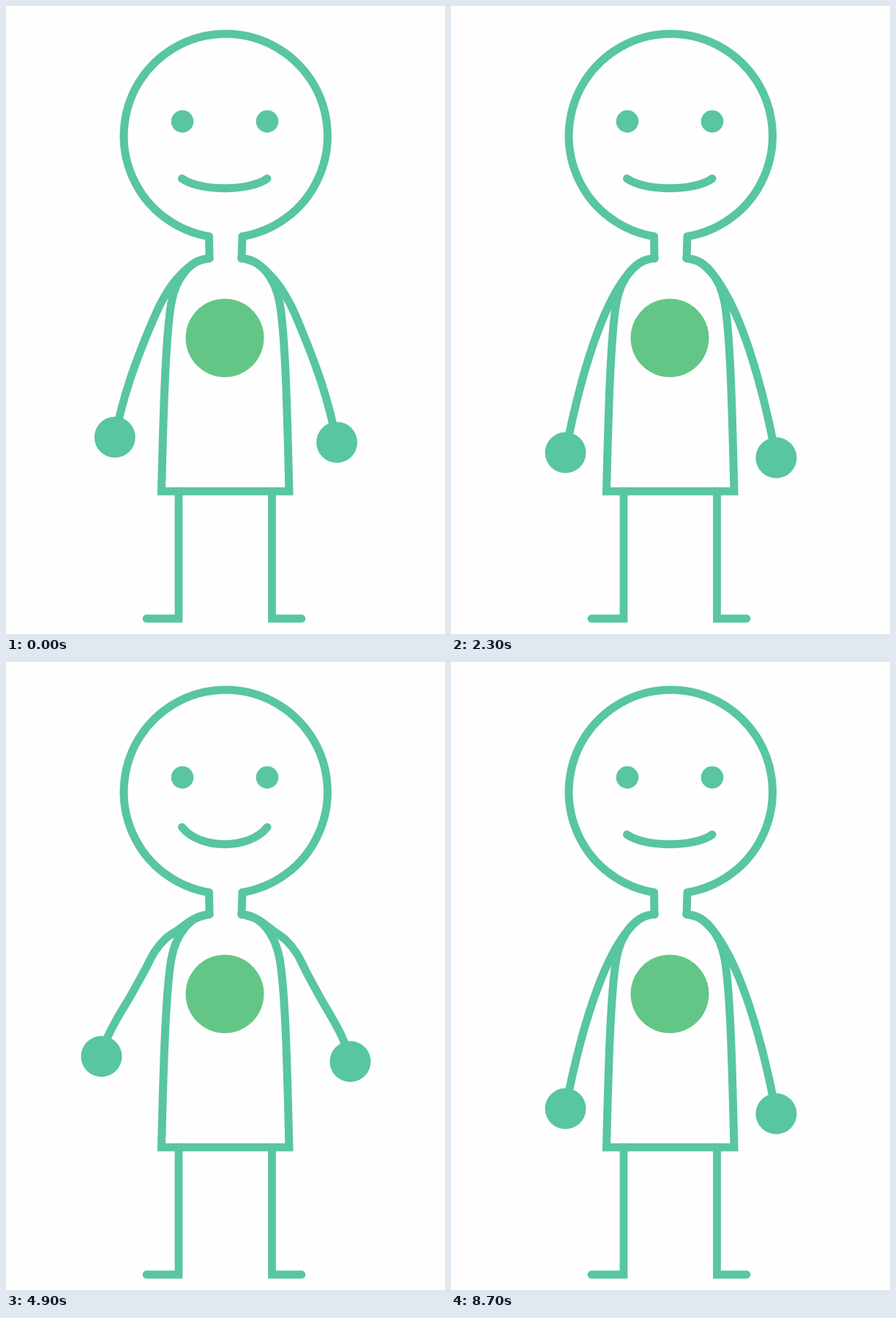
Write an HTML page with a canvas that moves like this. It is 600 px wide and 857 px high and loops after 9 s.

```html
<!DOCTYPE html>
<html lang="en">
<head>
<meta charset="utf-8">
<title>Flexing figure</title>
<style>
  html, body { margin: 0; width: 100%; height: 100%; overflow: hidden; background: #fefeff; }
  canvas { display: block; width: 600px; height: 857px; }
</style>
</head>
<body>
<canvas id="stage" width="600" height="857"></canvas>
<script>
const ctx = document.getElementById('stage').getContext('2d');
const GREEN = '#58c69e', BADGE = '#63c686', PAPER = '#fefeff';
const CYCLE = 3000, STEP = 100, HAND = 28, JOINTS = 10;

const clamp = x => Math.max(0, Math.min(1, x));
const smooth = x => clamp(x) ** 2 * (3 - 2 * clamp(x));
const mix = (a, b, k) => a + (b - a) * k;

// Left arm, from neck over shoulder, biceps and elbow to the hand
const hanging = Array.from({ length: JOINTS }, (_, i) => {
  const k = i / (JOINTS - 1), m = 1 - k;
  const bezier = (a, b, c, d) => a * m ** 3 + 3 * b * m * m * k + 3 * c * m * k * k + d * k ** 3;
  return [bezier(278, 228, 183, 156.5), bezier(344, 345, 470, 609.5)];
});
const half = [[278,344],[240,358],[202,378],[182,362],[166,351],[150,361],[112,386],[78,378],[57,348],[50,318]];
const raised = [[278,344],[240,358],[198,374],[175,345],[155,329],[137,340],[108,360],[58,342],[34,293],[40,245]];
const flexed = [[278,344],[240,358],[200,372],[176,340],[156,320],[138,329],[104,351],[56,335],[38,298],[60,241]];
const poses = [hanging, half, raised, flexed];

// Progress through the poses: a quick lift, a short hold and an almost even drop
function lift(t) {
  const up = smooth(((t + 290) / 970) ** 2);
  const down = clamp((2000 - t) / 1082) ** 1.08;
  return 3.2 * Math.min(up, down);
}

const smile = t => Math.min(smooth(t / 517), smooth((2250 - t) / 833));

function leftArm(u) {
  const n = Math.min(2, Math.floor(u)), k = u - n;
  // The forearm swings outwards on its way past the elbow
  const swing = n === 1 ? 14 * Math.sin(Math.PI * k) : 0;
  return poses[n].map(([x, y], i) => {
    const [x1, y1] = poses[n + 1][i];
    return [mix(x, x1, k) - swing * (i / (JOINTS - 1)) ** 3, mix(y, y1, k)];
  });
}

// The right arm hangs slightly lower and wider
function rightArm(points, u) {
  const slack = clamp((1 - u) * 1.33);
  return points.map(([x, y], i) => [
    (i ? mix(594, 601, slack) : 600) - x,
    y + 7 * slack * i / (JOINTS - 1)
  ]);
}

function disc(x, y, r, color = GREEN) {
  ctx.fillStyle = color;
  ctx.beginPath();
  ctx.arc(x, y, r, 0, 2 * Math.PI);
  ctx.fill();
}

function stroke(path, join = 'round', cap = 'round', width = 11) {
  ctx.strokeStyle = GREEN;
  ctx.lineWidth = width;
  ctx.lineJoin = join;
  ctx.lineCap = cap;
  ctx.stroke(new Path2D(path));
}

function drawArm(p) {
  const at = i => p[Math.max(0, Math.min(p.length - 1, i))];
  let path = `M${p[0]}`;
  for (let i = 0; i < p.length - 1; i++) {
    const [a, b, c, d] = [at(i - 1), at(i), at(i + 1), at(i + 2)];
    const out = b.map((v, j) => v + (c[j] - a[j]) / 6);
    const into = c.map((v, j) => v - (d[j] - b[j]) / 6);
    path += `C${out} ${into} ${c}`;
  }
  stroke(path);
  disc(...p[p.length - 1], HAND);
}

function drawBody() {
  stroke('M278 344.5L277.5 314.5A139.2 139.2 0 1 1 323 314.5L322 344.5');
  stroke('M278 344.5C252 345 232 372 226 405');
  stroke('M322 344.5C348 345 368 372 374 405');
  stroke('M226 405C218 450 215 560 212.5 662.3L387 662.3C384.5 560 382 450 374 405', 'miter', 'butt');
  stroke('M192 836L236 836L236 662', 'miter', 'round', 10.8);
  stroke('M404 836L363.5 836L363.5 662', 'miter', 'round', 10.8);
  disc(241, 157.5, 15.3);
  disc(357, 157.5, 15.3);
  disc(299, 453, 53.5, BADGE);
}

function drawMouth(amount) {
  const y = mix(235.5, 209, amount);
  const low = y + (248.7 - y) * 4 / 3;
  stroke(`M240.5 ${y}C265 ${low} 333 ${low} 357 ${y}`);
}

function frame(now) {
  const t = Math.floor(now / STEP) * STEP % CYCLE;
  const u = lift(t);
  const arm = leftArm(u);
  ctx.fillStyle = PAPER;
  ctx.fillRect(0, 0, 600, 857);
  drawBody();
  drawMouth(smile(t));
  drawArm(arm);
  drawArm(rightArm(arm, u));
}

let start;
function tick(now) {
  start ??= now;
  frame(now - start);
  requestAnimationFrame(tick);
}
frame(0);
requestAnimationFrame(tick);
</script>
</body>
</html>
```
